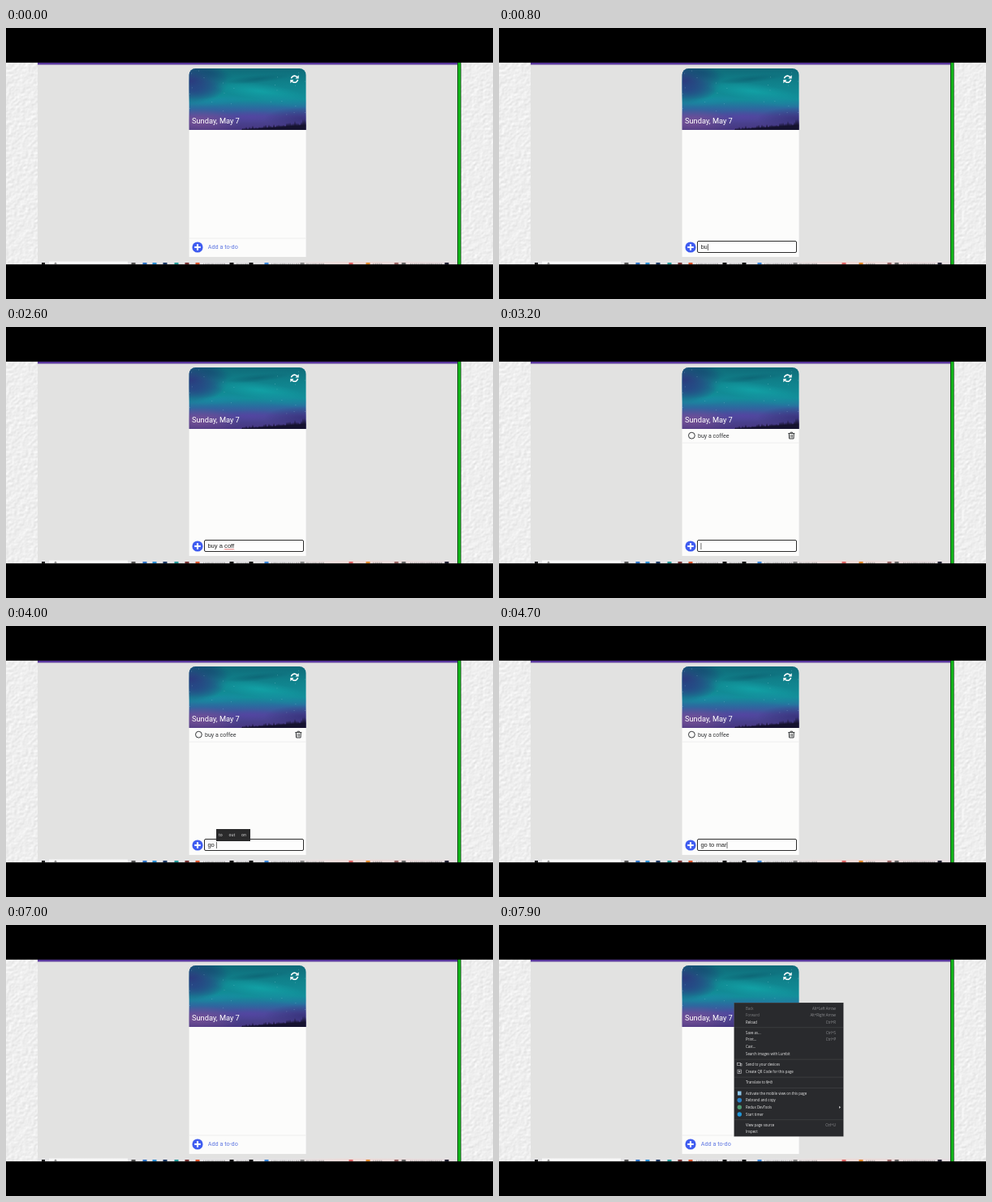
An HTML page with a canvas that plays this animation: 600 px wide and 335 px high, repeating every 8 s.

```html
<!DOCTYPE html>
<html lang="en">
<head>
<meta charset="utf-8">
<title>To-do list</title>
<style>
  html, body { margin: 0; width: 100%; height: 100%; overflow: hidden; background: #000; }
  canvas { display: block; }
</style>
</head>
<body>
<canvas id="stage" width="600" height="335"></canvas>
<script>
const LOOP = 8000;
const APP = 'Roboto, sans-serif';
const FIELD = '"Liberation Sans", Arial, sans-serif';
const SYSTEM = '"Open Sans", "Noto Sans", sans-serif';
const INK = '#333537';
const BLUE = '#3f5cf0';
const RULE = '#efefee';

const stage = document.getElementById('stage').getContext('2d');
const backdrop = document.createElement('canvas');
backdrop.width = 600;
backdrop.height = 335;
let c = backdrop.getContext('2d');

function box(x, y, w, h, color) {
  c.fillStyle = color;
  c.fillRect(x, y, w, h);
}

function round(x, y, w, h, r) {
  c.beginPath();
  c.roundRect(x, y, w, h, r);
}

function disc(x, y, r, color) {
  c.fillStyle = color;
  c.beginPath();
  c.arc(x, y, r, 0, 7);
  c.fill();
}

function line(color, width, ...points) {
  c.strokeStyle = color;
  c.lineWidth = width;
  c.beginPath();
  for (let i = 0; i < points.length; i += 2) c.lineTo(points[i], points[i + 1]);
  c.stroke();
}

function text(str, x, y, size, color, family, align = 'left') {
  c.font = `${size}px ${family}`;
  c.fillStyle = color;
  c.textAlign = align;
  c.fillText(str, x, y);
  return c.measureText(str).width;
}

function seeded(seed) {
  return () => (seed = seed * 16807 % 2147483647) / 2147483647;
}

function gradient(x0, y0, x1, y1, stops) {
  const g = c.createLinearGradient(x0, y0, x1, y1);
  stops.forEach(stop => g.addColorStop(...stop));
  return g;
}

// Rough plaster: smooth noise lit from the top left
function drawWall(x0, width) {
  const height = 251, rand = seeded(x0 + 77), cols = 40;
  const grid = Array.from({ length: cols * 150 }, rand);
  const ease = v => v * v * (3 - 2 * v);
  const noise = (x, y) => {
    const i = Math.floor(x), j = Math.floor(y), u = ease(x - i), v = ease(y - j);
    const at = (a, b) => grid[b * cols + a];
    return (at(i, j) * (1 - u) + at(i + 1, j) * u) * (1 - v) +
      (at(i, j + 1) * (1 - u) + at(i + 1, j + 1) * u) * v;
  };
  const bump = (x, y) => noise(x / 3.4, y / 3) + 0.3 * noise(x / 2, y / 2);
  const img = c.createImageData(width, height);
  for (let y = 0; y < height; y++) {
    for (let x = 0; x < width; x++) {
      const shade = 238 + 24 * (bump(x + 1, y + 1) - bump(x, y));
      img.data.set([shade, shade, shade, 255], 4 * (y * width + x));
    }
  }
  c.putImageData(img, x0, 42);
}

function glow(x, y, rx, ry, rgb, alpha, tilt = 0) {
  c.save();
  c.translate(x, y);
  c.rotate(tilt);
  c.scale(rx, ry);
  const g = c.createRadialGradient(0, 0, 0, 0, 0, 1);
  g.addColorStop(0, `rgba(${rgb},${alpha})`);
  g.addColorStop(1, `rgba(${rgb},0)`);
  c.fillStyle = g;
  c.fillRect(-1, -1, 2, 2);
  c.restore();
}

function drawSky() {
  c.save();
  round(225.6, 50, 144, 76, [8, 8, 0, 0]);
  c.clip();
  box(225, 50, 145, 76, gradient(0, 50, 0, 126, [[0, '#0f6b79'], [0.25, '#10828c'],
    [0.5, '#128f9a'], [0.64, '#2b6b9f'], [0.78, '#4c4a9a'], [1, '#463680']]));
  glow(228, 66, 46, 28, '44,56,124', 1);
  glow(232, 76, 36, 16, '40,66,134', 0.7);
  glow(250, 55, 30, 10, '18,74,112', 0.6, 0.2);
  glow(312, 78, 56, 10, '18,170,172', 0.7, 0.12);
  glow(262, 90, 36, 6, '26,136,164', 0.7, -0.1);
  glow(340, 90, 44, 8, '24,140,160', 0.6, 0.1);
  glow(310, 63, 40, 5, '12,92,110', 0.6, -0.1);
  glow(238, 116, 52, 16, '132,86,152', 0.75);
  glow(300, 110, 40, 8, '88,66,168', 0.5);
  glow(366, 112, 48, 14, '46,40,110', 0.6);
  const rand = seeded(19);
  for (let i = 0; i < 24; i++) {
    box(226 + 144 * rand(), 52 + 58 * rand(), 0.7, 0.7, 'rgba(190,235,245,.5)');
  }
  c.fillStyle = '#15122f';
  c.beginPath();
  c.moveTo(290, 126);
  for (let x = 292; x <= 372; x += 2) {
    const ridge = 125 - 6 * (x - 290) / 80;
    c.lineTo(x, ridge - rand() * (x > 355 ? 7 : 4));
    c.lineTo(x + 1, ridge + 1);
  }
  c.lineTo(372, 126);
  c.fill();
  c.restore();
  text('Sunday, May 7', 229, 118.4, 9.25, '#fff', APP);
}

function drawTaskbar() {
  box(39, 288.7, 517, 4, gradient(39, 0, 556, 0,
    [[0, '#e4e4e6'], [0.6, '#e6e4e6'], [0.75, '#efdbd8'], [1, '#e6dfe2']]));
  box(44, 290, 4, 3, '#222');
  box(53, 288.7, 97, 4, '#fafafa');
  disc(61, 291.2, 1.4, '#999');
  const icons = [[157, '#555'], [171, '#2f74c8'], [183, '#2c8fd6'], [196, '#1d3b66'], [210, '#259b9b'],
    [223, '#733'], [236, '#d9532c'], [278, '#111'], [302, '#111'], [321, '#3b86d8'], [365, '#888'],
    [425, '#d66'], [446, '#e08a2c'], [481, '#966'], [490, '#666'], [543, '#223']];
  for (const [x, color] of icons) box(x - 2.5, 290, 5, 3, color);
  const rand = seeded(5);
  for (const [from, to] of [[243, 270], [284, 298], [327, 360], [370, 392], [452, 464], [498, 536]]) {
    for (let x = from; x < to; x += 2.5) box(x, 290.7, 1 + rand(), 2, '#8888');
  }
}

function drawBackdrop() {
  drawWall(0, 39);
  drawWall(560, 40);
  box(39, 42, 517, 251, '#e2e2e1');
  box(39, 42, 517, 3.4, '#5c3a9f');
  box(556, 42, 4.7, 251, '#174d1b');
  box(557, 42, 3, 251, '#12b41a');
  c.fillStyle = '#fcfcfb';
  round(225.6, 50, 144, 233, [8, 8, 0, 0]);
  c.fill();
  drawSky();
  drawTaskbar();
  box(0, 0, 600, 42.8, '#000');
  box(0, 292.2, 600, 43, '#000');
  disc(236, 271, 6.6, BLUE);
  line('#fff', 2.1, 232.2, 271, 239.8, 271);
  line('#fff', 2.1, 236, 267.2, 236, 274.8);
}

function drawRefresh(angle) {
  c.save();
  c.translate(355.5, 63.2);
  c.rotate(angle);
  for (let half = 0; half < 2; half++) {
    c.strokeStyle = c.fillStyle = '#fff';
    c.lineWidth = 1.6;
    c.beginPath();
    c.arc(0, 0, 4.1, Math.PI * 1.06, Math.PI * 1.8);
    c.stroke();
    c.beginPath();
    c.moveTo(5.2, -5);
    c.lineTo(5.2, -0.8);
    c.lineTo(1, -0.8);
    c.fill();
    c.rotate(Math.PI);
  }
  c.restore();
}

function drawItem(label, y, done) {
  if (done) {
    disc(237.4, y, 4.5, '#6fa52f');
    line('#fff', 1.2, 235.1, y + 0.1, 236.8, y + 1.7, 239.8, y - 1.5);
  } else {
    c.strokeStyle = INK;
    c.lineWidth = 1;
    c.beginPath();
    c.arc(237.4, y, 3.9, 0, 7);
    c.stroke();
  }
  const w = text(label, 245, y + 2.4, 7.05, done ? '#bdbdbd' : INK, APP);
  if (done) line('#bdbdbd', 0.7, 245, y + 0.2, 245 + w, y + 0.2);
  line(INK, 1, 356.3, y - 2.6, 364.3, y - 2.6);
  line(INK, 0.9, 358.7, y - 2.8, 359.2, y - 4, 361.4, y - 4, 361.9, y - 2.8);
  line(INK, 1, 357.3, y - 2.6, 357.6, y + 3.8, 363, y + 3.8, 363.3, y - 2.6);
  for (const x of [359.1, 360.3, 361.5]) line(INK, 0.6, x, y - 1, x, y + 2.5);
  box(226, y + 8.5, 143.6, 1, RULE);
}

function drawPrompt() {
  box(226, 259.5, 143.6, 1, RULE);
  text('Add a to-do', 248.7, 273.3, 7.25, '#6078e2', APP);
}

function drawField(value, sinceKey, misspelt) {
  c.fillStyle = '#fdfdfd';
  round(244.5, 263.5, 122, 14, 1.5);
  c.fill();
  c.strokeStyle = '#2c2c2c';
  c.lineWidth = 1;
  c.stroke();
  const w = text(value, 248.4, 273.3, 7.6, '#222', FIELD);
  if (sinceKey % 1000 < 500) box(248.6 + w, 267, 0.7, 8, '#333');
  if (misspelt) {
    const wave = [];
    for (let x = 269; x <= 281; x++) wave.push(x, 274.8 + (x % 2 ? 0.5 : -0.5));
    line('#e03030', 0.7, ...wave);
  }
}

function drawHints(x, width, words) {
  c.save();
  c.beginPath();
  c.rect(x, 251, width, 15);
  c.clip();
  box(x, 251, width, 15, '#2a2a2b');
  for (const [word, left] of words) text(word, left, 260.3, 4.9, '#f2f2f2', SYSTEM);
  c.restore();
}

const menu = [
  [103, 'Back', 'Alt+Left Arrow'], [111.6, 'Forward', 'Alt+Right Arrow'], [120, 'Reload', 'Ctrl+R'],
  [133, 'Save as...', 'Ctrl+S'], [141.8, 'Print...', 'Ctrl+P'], [150.5, 'Cast...'],
  [159.2, 'Search images with Lumbit'],
  [172.3, 'Send to your devices'], [181, 'Create QR Code for this page'],
  [194.6, 'Translate to हिन्दी'],
  [208, 'Activate the mobile view on this page'], [216.6, 'Rebrand and copy'],
  [225.3, 'Redux DevTools'], [234, 'Start timer'],
  [247, 'View page source', 'Ctrl+U'], [255.7, 'Inspect']
];

function drawMenu() {
  box(289.5, 96, 135, 165.5, '#4a4b4d');
  box(290, 96.5, 134, 164.5, '#292a2d');
  for (const y of [126.5, 165.8, 187.8, 201.3, 240.5]) box(290, y, 134, 0.6, '#454649');
  for (const [y, label, keys] of menu) {
    text(label, 304, y + 1.6, 4.37, y < 115 ? '#7d7e80' : '#e8e8e8', SYSTEM);
    if (keys) text(keys, 415, y + 1.6, 4.37, '#909194', SYSTEM, 'right');
  }
  c.strokeStyle = '#b5b6b8';
  c.lineWidth = 0.7;
  c.strokeRect(293.5, 170.5, 4, 3);
  c.strokeRect(297.5, 171.5, 1.5, 2.5);
  c.strokeRect(294, 179, 4.5, 4.5);
  box(295.2, 180.2, 2, 2, '#b5b6b8');
  box(294, 205.5, 4.5, 5, '#8fc7ea');
  disc(296.3, 216.6, 2.8, '#2a7fc4');
  disc(296.3, 225.3, 2.7, '#4d9a72');
  disc(296.3, 234, 2.7, '#2196d8');
  c.fillStyle = '#c8c8c8';
  c.beginPath();
  c.moveTo(419, 223.7);
  c.lineTo(421, 225.3);
  c.lineTo(419, 226.9);
  c.fill();
}

// Field contents from each time on; null means not focused
const typing = [
  [0, null], [500, ''], [700, 'b'], [800, 'bu'], [900, 'buy'], [1000, 'buy '], [1200, 'buy a'],
  [1300, 'buy a '], [1400, 'buy a c'], [1600, 'buy a co'], [1900, 'buy a cof'], [2100, 'buy a coff'],
  [2700, 'buy a coffe'], [2900, 'buy a coffee'], [3200, ''], [3600, 'g'], [3700, 'go'], [3900, 'go '],
  [4200, 'go t'], [4300, 'go to'], [4400, 'go to '], [4500, 'go to m'], [4600, 'go to ma'],
  [4700, 'go to mar'], [4800, 'go to mark'], [4850, 'go to marke'], [4900, 'go to market'],
  [5000, ''], [5300, null]
];

const within = (t, from, to) => t >= from && t < to;

function draw(t) {
  c.drawImage(backdrop, 0, 0);
  drawRefresh(within(t, 6400, 6600) ? Math.PI / 4 : 0);
  if (within(t, 3200, 6500)) drawItem('buy a coffee', 134.2, t >= 5400);
  if (within(t, 5000, 6500)) drawItem('go to market', 151.8, t >= 6000);
  const [since, value] = typing.findLast(step => step[0] <= t);
  if (value === null) drawPrompt();
  else drawField(value, t - since, value === 'buy a coff');
  if (value === 'buy a co') drawHints(273, 55, [['coat', 276], ['couple', 293.7], ['coffee', 317]]);
  if (value === 'go ') drawHints(259, 42, [['to', 262], ['out', 274.5], ['on', 290]]);
  if (t >= 7500) drawMenu();
}

drawBackdrop();
c = stage;
const start = performance.now();
function tick() {
  draw((performance.now() - start) % LOOP);
  requestAnimationFrame(tick);
}
tick();
</script>
</body>
</html>
```
